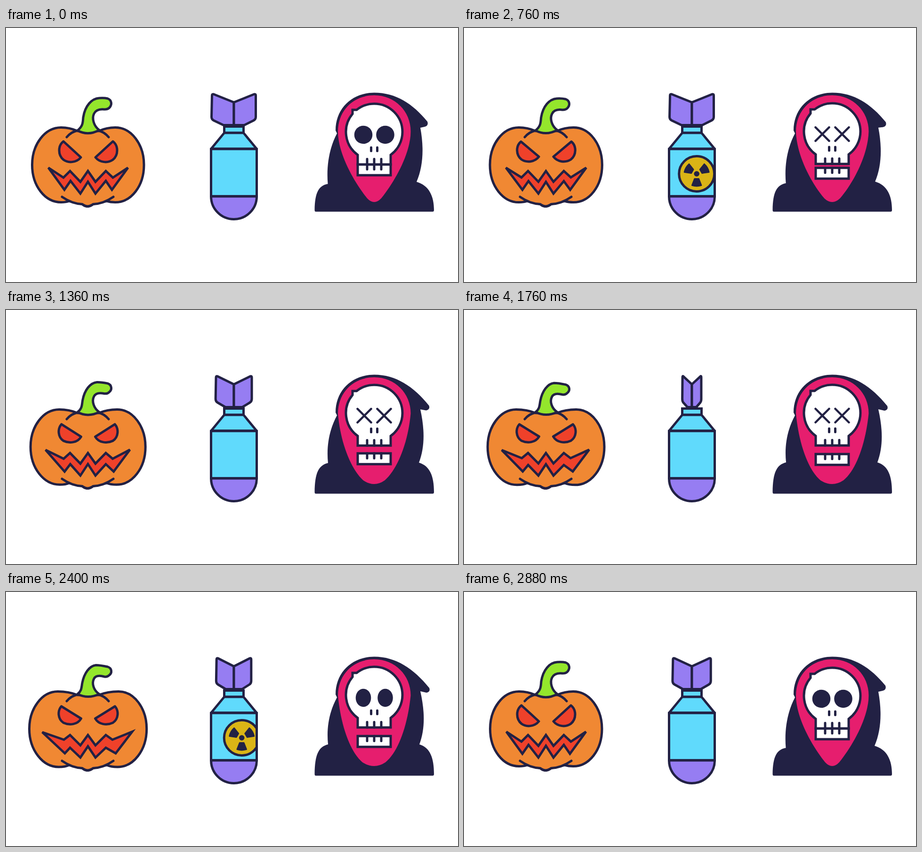
An HTML page for the animation above (2920 ms loop, 960x540 px).

```html
<!DOCTYPE html>
<html lang="en">
<head>
<meta charset="utf-8">
<title>Pumpkin, bomb, reaper</title>
<style>
  html, body { margin: 0; width: 100%; height: 100%; overflow: hidden; background: #fff; }
  svg { display: block; width: 960px; height: 540px; }
  .line { stroke: #222144; stroke-width: 5; stroke-linejoin: round; stroke-linecap: round; }
  .sharp { stroke-linejoin: miter; }
  .navy { fill: #222144; }
  .orange { fill: #f08833; }
  .red { fill: #ef412a; }
  .green { fill: #94e62c; }
  .purple { fill: #967df2; }
  .cyan { fill: #60dafc; }
  .gold { fill: #dab416; }
  .pink { fill: #e61e6e; }
  .white { fill: #fff; }
  .none { fill: none; }
  #fins path { vector-effect: non-scaling-stroke; }
</style>
</head>
<body>
<svg viewBox="0 0 960 540">
  <defs>
    <clipPath id="shell"><rect x="435.5" y="257" width="97" height="101"/></clipPath>
    <path id="blade" class="navy" d="M-4.5 10.5H4.5L10 24.5Q0 28 -10 24.5Z" stroke="#222144" stroke-width="2.5" stroke-linejoin="round"/>
  </defs>

  <g class="line" id="pumpkin">
    <path class="orange" data-part="body"
      d="M174 219L152 219Q135 211.500 117 211.500C82 211.500 55.500 248 55.500 291C55.500 336 83 370.500 117 370.500Q127 370.500 134 368L162 374.500Q173 384 185 374.500L214 368Q222 370.500 232 370.500C266 370.500 293 336 293 291C293 248 267 211.500 232 211.500Q214 211.500 197 219Z"
      data-to="M174 219L152 219Q133 211.500 110 211.500C76 211.500 49.500 248 49.500 291C49.500 336 78 372 112 372Q126 372 134 368L162 374.500Q173 384 185 374.500L214 368Q223 372 237 372C271 372 298.700 336 298.700 291C298.700 248 273 211.500 239 211.500Q216 211.500 197 219Z"/>
    <path class="orange" stroke="none" d="M130 360H218L205 371L185 374H162L140 370Z"/>
    <path class="none" d="M119 359C132 368 148 374 162 374.500Q173 384 185 374.500C200 374 215 368 228 359M129 232Q138 221 152 218M218 232Q209 221 196 218"/>
    <path class="green" data-part="stem"
      d="M152 218C164 208 163 200 164 190C168 165 182 150 198 149C204 148.500 212 149 216 150C224 153 226 162 220 169C217 172.500 213 173 209 173C200 172 191 174 187 182C182 192 186 208 198 217Q174 230 152 218Z"
      data-to="M152 217C161 210 160 203 162 193C166 173 177 157 191 155.500C199 155.500 209 157.500 216 159C225 162 226 172 219 177C216 180 212 180.500 209 180C200 177.500 191 177 187 184C181 195 187 210 198 217Q174 228 152 217Z"/>
    <path class="red" data-part="eyes" data-twin
      d="M122 241L159 275C150 286 133 288 122 280C110 270 110 250 122 241Z"
      data-to="M117.500 243L159.500 269C152 282 135 284 122 278C110 270 109 253 117.500 243Z"/>
    <path class="red sharp" data-part="mouth"
      d="M90 297L122 318L136 304L158 327L174 304L190 327L212 304L227 318L259 297L225 344L212 325L190 352L174 327L158 352L137 325L124 344Z"
      data-to="M77 298L123 314L136 304L158 326L174 304L190 326L212 304L226 314L268 297L233 343L212 331L190 352L174 328L158 352L136 331L125 343Z"/>
  </g>

  <g class="line">
    <g id="fins" class="purple">
      <path d="M0 158L-43 140.800Q-46.500 140 -46.500 143.500L-47.500 189Q-47.500 194 -43 196.500L-22 206.500H0Z"/>
      <path d="M0 158L43 140.800Q46.500 140 46.500 143.500L46.500 189Q46.500 194 42 196.500L22 206.500H0Z"/>
    </g>
    <path class="cyan sharp" d="M463.500 209.500H504.500V223H463.500Z"/>
    <path class="cyan" d="M463.500 223H504.500L532.500 257H435.500Z"/>
    <path class="cyan" d="M435.500 257H532.500V358H435.500Z"/>
    <g clip-path="url(#shell)">
      <g id="sign">
        <circle class="gold" r="37.500"/>
        <g stroke="none">
          <circle class="navy" r="5.800"/>
          <use href="#blade"/>
          <use href="#blade" transform="rotate(120)"/>
          <use href="#blade" transform="rotate(240)"/>
        </g>
      </g>
    </g>
    <path class="none" d="M435.500 257H532.500V358H435.500Z"/>
    <path class="purple" d="M435.500 358H532.500A48.500 48.500 0 0 1 435.500 358Z"/>
  </g>

  <path class="navy" data-part="hood"
    d="M658 390.500Q655.500 390.500 655.500 387C656 350 664 335 683.500 331.500C680 290 688 252 703 224L700 218C700 170 736 137.500 782 137.500C828 137.500 864 161 895 199Q898 208 889 210L880 212C888 255 886 295 872 327C899 335 909 358 909 387Q909 390.500 906 390.500Z"
    data-to="M658 390.500Q655.500 390.500 655.500 387C656 345 664 329 684 324C680 285 688 252 703 224L700 218C700 170 736 137.500 782 137.500C828 137.500 866 163 899 204Q902 212 893 214L880 211C890 255 890 292 878 324C901 331 909 353 909 387Q909 390.500 906 390.500Z"/>
  <path class="pink" data-part="hood"
    d="M705 220C705 175 738 143 782 143C826 143 859.500 177 859.500 220C859.500 266 826 326 797 362Q782 378 767 362C738 326 705 266 705 220Z"
    data-to="M705 220C705 175 738 143 782 143C826 143 859.500 177 859.500 220C853 284 833 340 806 362Q782 378 757 362C731 340 711 284 705 220Z"/>

  <g class="line sharp">
    <g id="jaw">
      <path class="white" d="M747 290H817V313H747Z"/>
      <path class="none" d="M767 290V300.500M782 290V300.500M797 290V300.500"/>
    </g>
    <g id="head">
      <path class="white" d="M747 290V269.700A60 60 0 0 1 736 182.500V174H744.700A60 60 0 0 1 782 161A60 60 0 0 1 842 221A60 60 0 0 1 817 269.700V290Z"/>
      <path class="none" d="M767 278.500V290M782 278.500V290M797 278.500V290M775.500 254V261.500M788.500 254V261.500"/>
      <g id="eyes" stroke="none"><ellipse class="navy" cx="759" cy="227" ry="19.300"/><ellipse class="navy" cx="805.500" cy="227" ry="19.300"/></g>
      <path id="crosses" class="none" stroke-width="4.500"/>
    </g>
  </g>
</svg>
<script>
const LOOP = 2920, STEP = 40;
const $ = id => document.getElementById(id);
const clamp = x => Math.min(1, Math.max(0, x));
const span = (t, a, b) => clamp((t - a) / (b - a));
const smooth = u => u * u * (3 - 2 * u);
const easeOut = u => 1 - (1 - u) * (1 - u);
const numbers = /-?\d+(\.\d+)?/g;

// Mirror the paths that come in pairs.
for (const path of document.querySelectorAll('[data-twin]')) {
  const twin = path.cloneNode();
  twin.setAttribute('transform', 'matrix(-1 0 0 1 349 0)');
  path.after(twin);
}

const morphs = [...document.querySelectorAll('[data-to]')].map(el => ({
  el,
  part: el.dataset.part,
  from: el.getAttribute('d'),
  to: el.dataset.to.match(numbers).map(Number)
}));

function morph({ el, from, to }, p) {
  let i = 0;
  el.setAttribute('d', from.replace(numbers, n => (+n + (to[i++] - n) * p).toFixed(2)));
}

function cross(x, half) {
  return `M${x - half} 212L${x + half} 241M${x + half} 212L${x - half} 241`;
}

function draw(t) {
  const pumpkinBack = 1 - smooth(span(t, 2420, 2890));
  const reaperBack = 1 - smooth(span(t, 2400, 2780));
  const pose = {
    body: smooth(span(t, 500, 2100)) * pumpkinBack,
    stem: smooth(span(t, 400, 1940)) * pumpkinBack,
    eyes: smooth(span(t, 400, 1540)) * pumpkinBack,
    mouth: smooth(span(t, 440, 2380)) * pumpkinBack,
    hood: smooth(span(t, 400, 1680)) * reaperBack
  };
  for (const m of morphs) morph(m, pose[m.part]);

  const open = easeOut(span(t, 400, 1780)) * reaperBack;
  $('jaw').setAttribute('transform', `translate(0 ${16.2 * open})`);
  $('head').setAttribute('transform', `translate(0 ${-2 * open})`);

  // Round eyes flip to crosses and back.
  const dead = smooth(span(t, 440, 680)) * (1 - smooth(span(t, 2280, 2440)));
  const rx = 19.3 * (1 - dead);
  for (const eye of $('eyes').children) eye.setAttribute('rx', rx);
  $('crosses').setAttribute('d', cross(761, 14.5 * dead) + cross(803, 14.5 * dead));
  $('crosses').style.display = dead > 0 ? '' : 'none';

  const turn = Math.abs(Math.cos(Math.PI * t / 750)) ** 1.1;
  $('fins').setAttribute('transform', `translate(484 0) scale(${Math.max(turn, 0.01)} 1)`);
  $('sign').setAttribute('transform', `translate(${343.7 + 0.198 * (t % 1607)} 310)`);
}

function frame() {
  const t = performance.now() % LOOP;
  draw(Math.floor(t / STEP) * STEP);
  requestAnimationFrame(frame);
}
frame();
</script>
</body>
</html>
```
